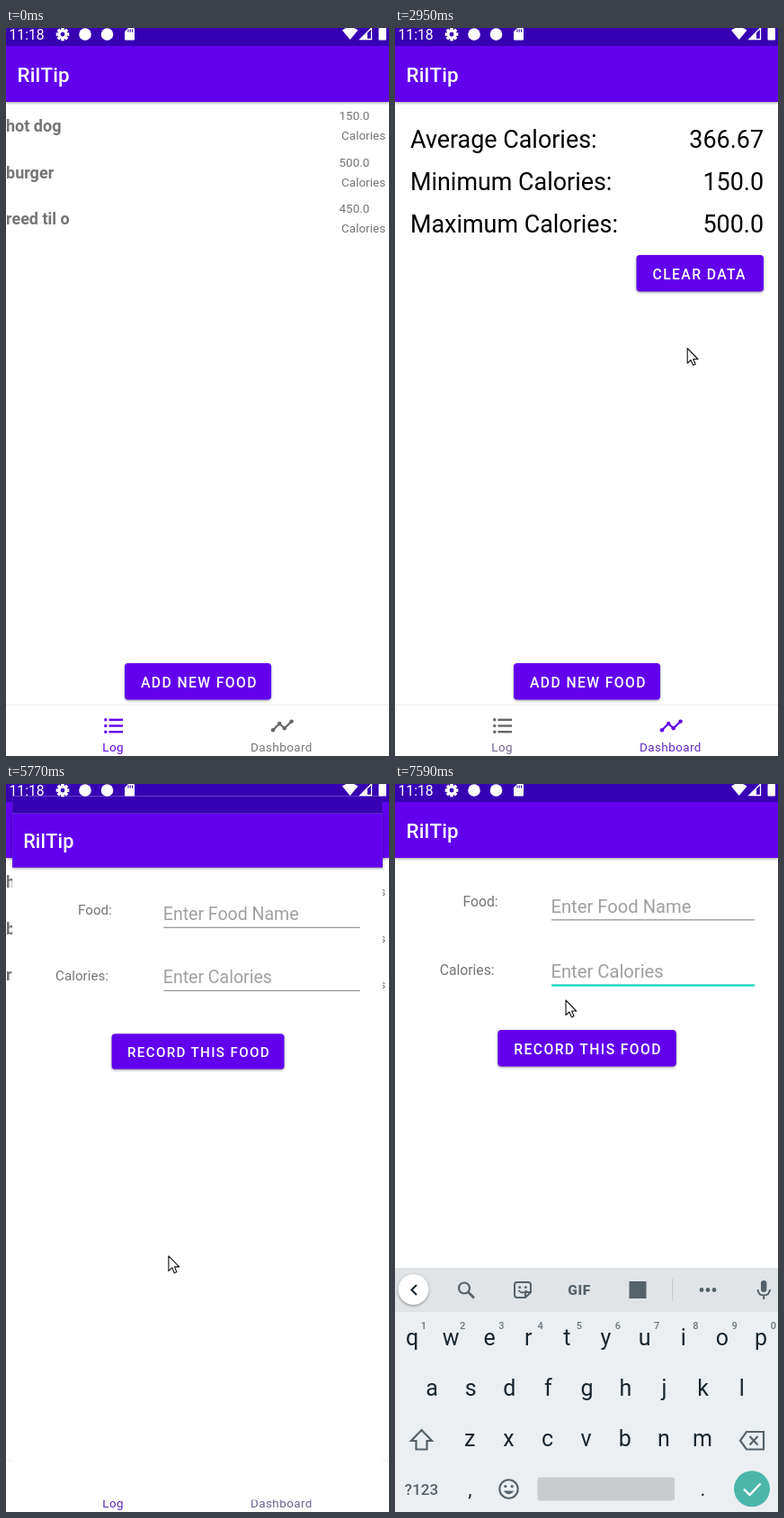
Write an HTML page that moves like this. It is 426 by 808 pixels and loops after 7.99 s.

```html
<!DOCTYPE html>
<html lang="en">
<head>
<meta charset="utf-8">
<title>Food log</title>
<style>
html, body { margin: 0; width: 100%; height: 100%; overflow: hidden; background: #fff; }
svg { display: block; width: 100vw; height: 100vh; font-family: Roboto, sans-serif; }
.raised { filter: drop-shadow(0 1px 1.5px #0006); }
</style>
</head>
<body>
<svg id="stage" viewBox="0 0 426 808"></svg>
<script>
const LOOP = 7990, PURPLE = '#6200ee', GREY = '#757575', INK = '#17252f', ICON = '#56626a';

const text = (x, y, size, str, fill, extra = '') =>
  `<text x="${x}" y="${y}" font-size="${size}" fill="${fill}" ${extra}>${str}</text>`;
const rect = (x, y, w, h, fill, extra = '') =>
  `<rect x="${x}" y="${y}" width="${w}" height="${h}" fill="${fill}" ${extra}/>`;
const circle = (x, y, r, fill, extra = '') =>
  `<circle cx="${x}" cy="${y}" r="${r}" fill="${fill}" ${extra}/>`;
const path = (d, fill, extra = '') => `<path d="${d}" fill="${fill}" ${extra}/>`;
const line = (d, color, width) => path(d, 'none', `stroke="${color}" stroke-width="${width}"`);
const group = (id, body) => `<g id="${id}">${body}</g>`;
const MIDDLE = 'text-anchor="middle"', END = 'text-anchor="end"';

const button = (x, y, w, label) =>
  rect(x, y, w, 40.5, PURPLE, 'rx="4" class="raised"') +
  text(x + 18, y + 26.6, 15.7, label, '#fff', 'font-weight="500" letter-spacing="1.4"');

const appBar = () =>
  rect(0, 20, 426, 62, PURPLE, 'class="raised"') + rect(0, 0, 426, 20, '#3700b3') +
  text(12.5, 60, 22.4, 'RilTip', '#fff', 'font-weight="500" letter-spacing=".17"');

function statusIcons() {
  const teeth = [0, 45, 90, 135].map(a =>
    rect(61.2, -.3, 3.6, 14.6, '#fff', `transform="rotate(${a} 63 7)"`)).join('');
  return text(3.5, 12.6, 15.7, '11:18', '#fff') +
    teeth + circle(63, 7, 5.4, '#fff') + circle(63, 7, 2.4, '#3700b3') +
    circle(88, 7, 6.8, '#fff') + circle(112.5, 7, 6.8, '#fff') +
    path('M136 0H142Q143 0 143 1V12.5Q143 13.5 142 13.5H133Q132 13.5 132 12.5V4Z', '#fff') +
    line('M136 1.5V4.5M138.3 1.5V4.5M140.6 1.5V4.5', '#3700b3', 1.1) +
    path('M374 2.5Q382.7 -4 391.5 2.5L382.7 13Z', '#fff') +
    path('M394 12.5L406.5 0V12.5Z', 'none', 'stroke="#fff" stroke-width="1.3"') +
    path('M394 12.5L402 4.5V12.5Z', '#fff') +
    rect(414.5, 0, 8.5, 13.5, '#fff', 'rx="1"');
}

function foodList() {
  const foods = [['hot dog', '150.0'], ['burger', '500.0'], ['reed til o', '450.0']];
  return foods.map(([name, amount], i) => {
    const y = i * 51.5;
    return text(0, 115 + y, 18, name, GREY, 'font-weight="700"') +
      text(370.5, 102 + y, 13.5, amount, GREY) + text(373, 124.3 + y, 13.5, 'Calories', GREY);
  }).join('');
}

function dashboard() {
  const stats = [['Average', '366.67'], ['Minimum', '150.0'], ['Maximum', '500.0']];
  return stats.map(([name, value], i) =>
    text(17, 133 + i * 47, 26.9, name + ' Calories:', '#000') +
    text(410, 133 + i * 47, 26.9, value, '#000', END)).join('') +
    button(268.5, 252, 141.5, 'CLEAR DATA');
}

function bottomNav() {
  const label = 'font-weight="400" letter-spacing=".45"';
  const rows = [767.8, 774.5, 781.2].map(y =>
    circle(110.8, y, 1.7, 'currentColor') + rect(114.5, y - 1.2, 15.5, 2.4, 'currentColor')).join('');
  const points = [[297, 779.2], [304.2, 772], [309.7, 777.2], [317.6, 769.6]];
  const dots = points.map(([x, y]) => circle(x, y, 2.2, 'currentColor')).join('');
  return rect(0, 750.5, 426, 1, '#ececec') +
    group('logIcon', rows) + group('dashIcon', line('M' + points.join('L'), 'currentColor', 2.2) + dots) +
    text(107.3, 803, 13.4, 'Log', 'currentColor', `id="logLabel" ${label}`) +
    text(272, 803, 13.4, 'Dashboard', 'currentColor', `id="dashLabel" ${label}`);
}

const form = () =>
  rect(0, 0, 426, 808, '#fff') + appBar() +
  text(75.5, 136, 15.7, 'Food:', GREY) + text(49.7, 211.8, 15.7, 'Calories:', GREY) +
  text(173.5, 142.6, 20.2, 'Enter Food Name', '#a0a0a0') +
  text(173.5, 215, 20.2, 'Enter Calories', '#a0a0a0') +
  rect(174, 150.3, 226, 1.1, '#858585') + rect(174, 222.8, 226, 1.1, '#858585') +
  rect(174, 222.5, 226, 2.1, '#03dac5', 'id="focus"') +
  rect(174, 196, 2, 24, '#03dac5', 'id="caret"') +
  button(114.3, 273, 198.5, 'RECORD THIS FOOD');

function keyboard() {
  const row = (keys, x, y) => [...keys].map((k, i) =>
    text(x + i * 43.1, y, 25, k, INK, MIDDLE)).join('');
  const digits = [...'1234567890'].map((d, i) =>
    text(32 + i * 43.2, 605, 11, d, '#6b767d', MIDDLE + ' font-weight="500"')).join('');
  return rect(0, 537, 426, 271, '#eceff1') + rect(0, 537, 426, 49, '#e0e4e7') +
    circle(20.5, 561, 17, '#fff', 'class="raised"') + line('M24 556L18.5 561.5L24 567', INK, 2) +
    circle(77, 559.5, 6, 'none', `stroke="${ICON}" stroke-width="2.2"`) + line('M81.5 564L88 570.5', ICON, 2.6) +
    path('M136 553H148Q151 553 151 556V564L145 570H136Q133 570 133 567V556Q133 553 136 553ZM151 564H145V570',
      'none', `stroke="${ICON}" stroke-width="2"`) +
    circle(138.7, 558.7, 1.4, ICON) + circle(145.3, 558.7, 1.4, ICON) + line('M137.5 562Q142 567 146.5 562', ICON, 1.8) +
    text(205, 566.5, 15.5, 'GIF', ICON, MIDDLE + ' font-weight="900" letter-spacing=".6"') +
    rect(260.5, 552, 19, 19, ICON) + rect(308, 549, 1, 25, '#c3c9cc') +
    [341, 348, 355].map(x => circle(x, 561.5, 2.4, ICON)).join('') +
    rect(407, 551, 6.4, 13, ICON, 'rx="3.2"') + line('M403.5 561Q404 567.5 410.2 567.5T417 561M410.2 567V572', ICON, 2) +
    row('qwertyuiop', 19, 623) + digits + row('asdfghjkl', 41, 679) + row('zxcvbnm', 83.3, 735) +
    path('M29.5 717L41 729H35.5V738.5H23.5V729H18Z', 'none', `stroke="${ICON}" stroke-width="2.2"`) +
    path('M391 719H410V738.5H391L384 728.7Z', 'none', `stroke="${ICON}" stroke-width="2.2"`) +
    line('M394.5 724L403.5 733.5M403.5 724L394.5 733.5', ICON, 2.2) +
    text(29.5, 789, 17, '?123', ICON, MIDDLE + ' font-weight="500"') +
    text(83.5, 790, 22, ',', INK, MIDDLE) + text(342.5, 790, 22, '.', INK, MIDDLE) +
    circle(126.5, 782.5, 10.2, 'none', `stroke="${ICON}" stroke-width="2.1"`) +
    circle(122.8, 779.5, 1.6, ICON) + circle(130.2, 779.5, 1.6, ICON) + path('M120.8 784.5H132.2Q126.5 792 120.8 784.5Z', ICON) +
    rect(158.5, 769.5, 152.5, 26, '#c8ccce', 'rx="3"') +
    circle(397, 782.3, 20, '#4db6ac') + line('M388 782.5L394.5 789L406.5 776.5', '#fff', 2.3);
}

stage.innerHTML =
  rect(0, 0, 426, 808, '#fff') + appBar() +
  group('listView', foodList()) + group('dashView', dashboard()) +
  button(132, 705, 163, 'ADD NEW FOOD') + bottomNav() +
  group('formView', form()) + group('keys', keyboard()) + statusIcons() +
  group('pointer', circle(0, 1, 13, '#e3a55c', 'id="halo" opacity=".6"') +
    path('M0 0V16.5L3.9 13L6.4 18.8L9 17.7L6.6 12H11.8Z', '#fff',
      'id="arrow" stroke="#111" stroke-width="1.1" stroke-linejoin="round"'));

// Pointer path: time, x, y
const route = [
  [850, 405, 798], [1120, 369, 787], [1460, 369, 787], [1720, 331, 787], [2400, 331, 787],
  [2880, 310, 422], [2950, 325, 356], [3230, 385, 215], [3450, 397, 195], [3720, 376, 209],
  [4000, 305, 390], [4340, 178, 661], [4550, 118, 784], [4620, 117, 785], [4980, 117, 785],
  [5300, 203, 721], [5560, 203, 721], [5970, 160, 338], [6320, 216, 160], [6450, 218, 205],
  [7000, 218, 205], [7260, 197, 215], [7400, 197, 215], [7590, 190, 240]
];
const clicks = [[2130, 2330], [4760, 4960], [5400, 5540], [6850, 7000]];

const $ = id => document.getElementById(id);
const show = (id, on) => $(id).style.display = on ? '' : 'none';
const clamp = v => Math.max(0, Math.min(1, v));
const easeOut = (t, start, length, power) => 1 - (1 - clamp((t - start) / length)) ** power;

function pointerAt(t) {
  const i = route.findIndex(k => k[0] > t);
  if (i < 0) return route.at(-1).slice(1);
  const [t0, x0, y0] = route[i - 1], [t1, x1, y1] = route[i], p = (t - t0) / (t1 - t0);
  return [x0 + (x1 - x0) * p, y0 + (y1 - y0) * p];
}

function draw(t) {
  const onDash = t >= 2200 && t < 4830;
  show('listView', !onDash);
  show('dashView', onDash);
  const [active, idle] = t < 2200 ? [PURPLE, GREY] : ['#6029c0', '#6f6090'];
  $('logIcon').style.color = onDash ? '#666' : PURPLE;
  $('dashIcon').style.color = onDash ? PURPLE : '#666';
  $('logLabel').style.color = onDash ? idle : active;
  $('dashLabel').style.color = onDash ? active : idle;

  const scale = .85 + .15 * easeOut(t, 5570, 640, 4);
  show('formView', t >= 5570);
  $('formView').setAttribute('opacity', clamp((t - 5570) / 130));
  $('formView').setAttribute('transform', `translate(213 404) scale(${scale}) translate(-213 -404)`);
  show('focus', t >= 6920);
  show('caret', t >= 6920 && t < 7400);
  show('keys', t >= 6920);
  $('keys').setAttribute('transform', `translate(0 ${271 * (1 - easeOut(t, 6920, 340, 3))})`);

  show('pointer', t >= 850);
  if (t < 850) return;
  const pressed = clicks.some(([a, b]) => t >= a && t < b);
  show('halo', pressed);
  $('arrow').setAttribute('fill', pressed ? '#ffff8c' : '#fff');
  $('pointer').setAttribute('transform', `translate(${pointerAt(t)})`);
}

const begin = performance.now();
function tick() {
  draw((performance.now() - begin) % LOOP);
  requestAnimationFrame(tick);
}
tick();
</script>
</body>
</html>
```
